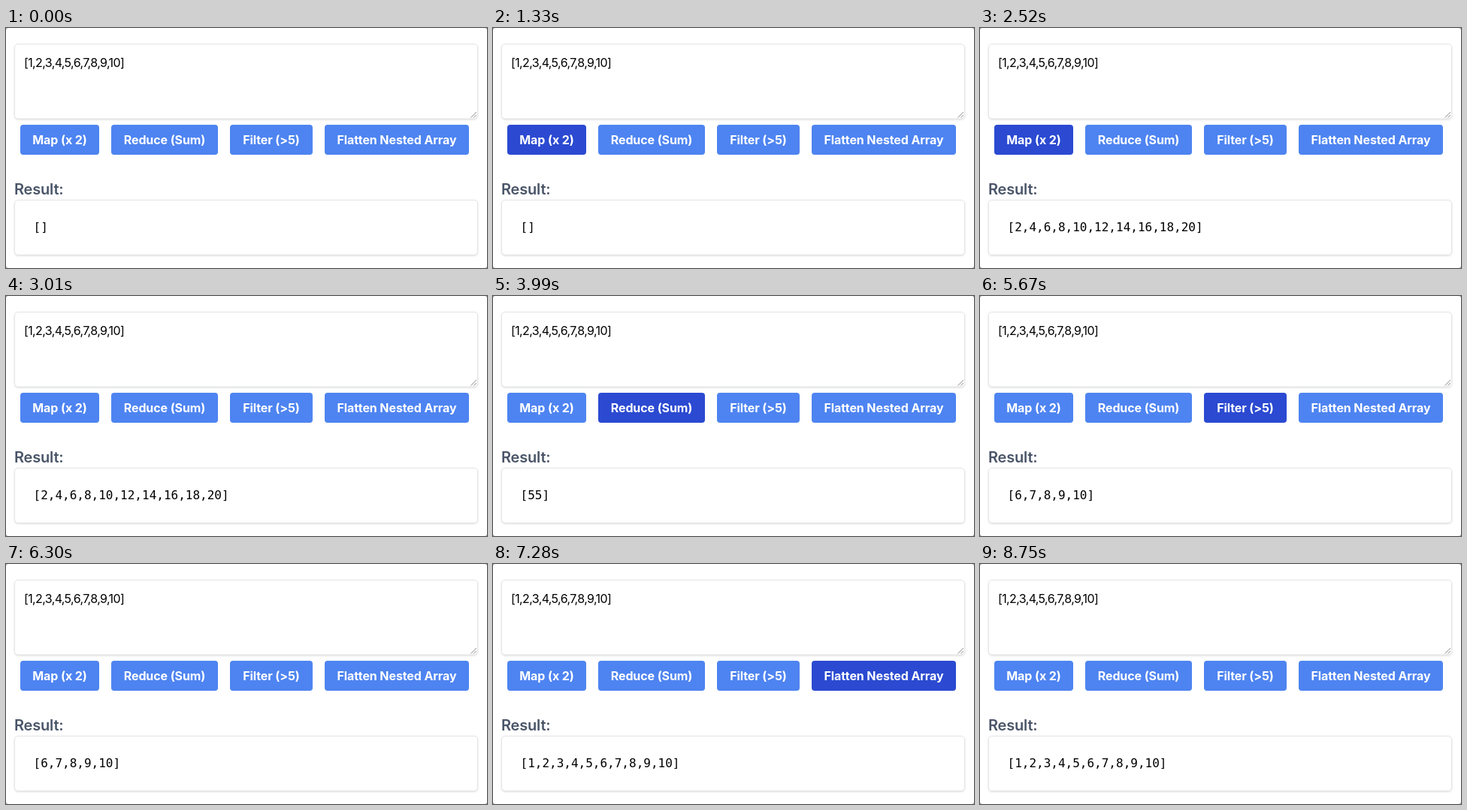
Recreate the animation shown at these times as an HTML page. Size 640x320 px, loop 9030 ms.

```html
<!DOCTYPE html>
<html lang="en">
<head>
<meta charset="utf-8">
<title>Array methods</title>
<style>
  html, body { margin: 0; width: 100%; height: 100%; overflow: hidden; background: #fff; }
  svg { display: block; width: 640px; height: 320px; }
  text { font: 16px Inter, sans-serif; white-space: pre; }
  .box { fill: #fff; stroke: #e3e5e8; filter: drop-shadow(0 1px 1px rgba(0, 0, 0, .13)); }
  .input { letter-spacing: -.62px; }
  .button text { font-weight: 700; fill: #fff; letter-spacing: -.1px; text-anchor: middle; }
  .heading { font-size: 20px; font-weight: 600; fill: #4a5568; letter-spacing: -.2px; }
  .result { font-family: "DejaVu Sans Mono", monospace; }
  .grip { stroke: #777; stroke-width: .8; }
  .corner { fill: #999; }
</style>
</head>
<body>
<svg viewBox="0 0 640 320">
  <rect width="640" height="320" fill="#fff"/>
  <path class="corner" d="M0 0h2L0 2zM640 0v2l-2-2zM0 320v-2l2 2zM640 320h-2l2-2z"/>
  <rect class="box" x="11.5" y="21.5" width="616" height="99.5" rx="4.5"/>
  <path class="grip" d="M618.5 119.5l7.5-7.5M622.5 119.5l3.5-3.5"/>
  <text class="input" x="24" y="52">[1,2,3,4,5,6,7,8,9,10]</text>
  <g id="buttons"></g>
  <text class="heading" x="11" y="222">Result:</text>
  <rect class="box" x="11.5" y="229.5" width="616" height="73" rx="4.5"/>
  <text class="result" id="result" x="36.5" y="271"></text>
</svg>
<script>
const LOOP = 9030;
const IDLE = '#4e84f1', HOVER = '#2b4ad1';
const numbers = [1, 2, 3, 4, 5, 6, 7, 8, 9, 10];

// Each button is hovered from enter to leave and clicked in between.
const actions = [
  { label: 'Map (x 2)', x: 19, w: 105, enter: 1330, click: 2030, leave: 3010, run: a => a.map(n => n * 2) },
  { label: 'Reduce (Sum)', x: 140, w: 142, enter: 3220, click: 3990, leave: 4760, run: a => [a.reduce((s, n) => s + n)] },
  { label: 'Filter (>5)', x: 298, w: 110, enter: 5110, click: 5670, leave: 6230, run: a => a.filter(n => n > 5) },
  { label: 'Flatten Nested Array', x: 424, w: 192, enter: 6720, click: 7280, leave: 7980, run: a => a.flat() }
];

function add(parent, name, attributes) {
  const node = document.createElementNS('http://www.w3.org/2000/svg', name);
  for (const key in attributes) node.setAttribute(key, attributes[key]);
  return parent.appendChild(node);
}

const buttons = document.getElementById('buttons');
const result = document.getElementById('result');

for (const action of actions) {
  const { x, w, label } = action;
  const group = add(buttons, 'g', { class: 'button' });
  action.face = add(group, 'rect', { x, y: 129, width: w, height: 40, rx: 4 });
  add(group, 'text', { x: x + w / 2, y: 155 }).textContent = label;
  action.output = JSON.stringify(action.run(numbers));
}

function draw() {
  const t = performance.now() % LOOP;
  let output = '[]';
  for (const { face, enter, click, leave, output: value } of actions) {
    face.setAttribute('fill', t >= enter && t < leave ? HOVER : IDLE);
    if (t >= click) output = value;
  }
  if (result.textContent !== output) result.textContent = output;
  requestAnimationFrame(draw);
}
draw();
</script>
</body>
</html>
```
